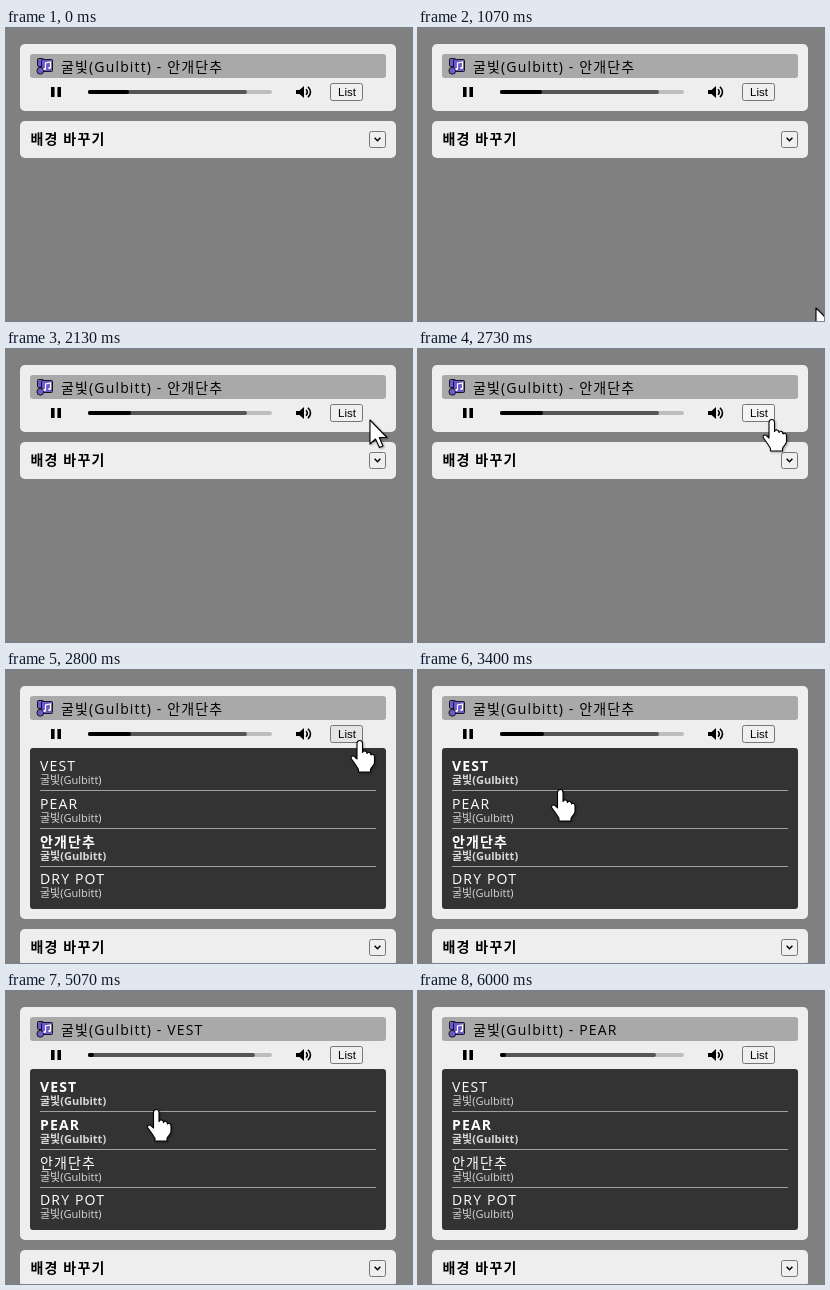
These frames come from a looping animation (406x293 px, 6.33 s). An HTML page:

```html
<!DOCTYPE html>
<html lang="ko">
<head>
<meta charset="utf-8">
<title>Music player</title>
<style>
  html, body { margin: 0; height: 100%; overflow: hidden; background: #808080; }
  svg { display: block; width: 406px; height: 293px; }
  text { font: 14px "Open Sans", "Noto Sans CJK KR", sans-serif; letter-spacing: 1.15px; white-space: pre; }
  .bold, .bold text { font-weight: 700; }
  #list text { fill: #fff; }
  #list .artist { font-size: 11px; letter-spacing: 0; fill: #d6d6d6; }
  #button text { font: 11.5px "Liberation Sans", Arial, sans-serif; letter-spacing: 0; }
  .panel { fill: #eee; }
  .box { fill: #efefef; stroke: #767676; }
  .cursor { fill: #fff; stroke: #000; stroke-width: 1.1; stroke-linejoin: round; filter: drop-shadow(1px 1px 1px #0005); }
</style>
</head>
<body>
<svg viewBox="0 0 406 293">
  <rect id="player" class="panel" x="14" y="16" width="376" rx="5"/>
  <rect x="24" y="26" width="356" height="24" rx="3" fill="#a9a9a9"/>
  <g stroke="#15131f" fill="#6a5cc0">
    <rect x="31.5" y="30.5" width="6" height="8" rx="1"/>
    <rect x="35.5" y="31.5" width="11" height="12" rx="1"/>
    <circle cx="34.3" cy="42.8" r="3.4"/>
    <path d="M39.5 41V35l5-1v6" fill="none" stroke="#fff" stroke-width="1.2"/>
    <path d="M37.5 41h2m3-1h2" stroke="#fff" stroke-width="2"/>
  </g>
  <text id="title" x="55" y="44"></text>

  <path id="pause" d="M45 59h3.6v10H45zm6.4 0H55v10h-3.6z"/>
  <path id="play" d="M46.5 59l9.5 5-9.5 5z"/>
  <rect x="82" y="62" width="184" height="4" rx="2" fill="#bdbdbd"/>
  <rect id="buffered" x="82" y="62" height="4" rx="2" fill="#555"/>
  <rect id="played" x="82" y="62" height="4" rx="2"/>
  <g id="volume">
    <path d="M290 62h3.5l4.5-4v12l-4.5-4H290z"/>
    <path d="M300 61.3q2.6 2.7 0 5.4m2-8q5 5.3 0 10.6" fill="none" stroke="#000" stroke-width="1.6"/>
  </g>
  <g id="button">
    <rect class="box" x="324.5" y="55.5" width="32" height="17" rx="2"/>
    <text x="332" y="68">List</text>
  </g>

  <g id="list"><rect x="24" y="78" width="356" height="161" rx="3" fill="#333"/></g>

  <g id="background">
    <rect class="panel" x="14" y="93" width="376" height="37" rx="5"/>
    <text class="bold" x="24.5" y="116">배경 바꾸기</text>
    <rect class="box" x="363.5" y="103.5" width="16" height="16" rx="2"/>
    <path d="M368.6 109.8l2.9 2.9 2.9-2.9" fill="none" stroke="#000" stroke-width="1.5"/>
  </g>

  <path id="arrow" class="cursor" d="M0 0V24L5.5 19 9.5 27.5 13 26 9.3 17.5H17z"/>
  <path id="hand" class="cursor" d="M-2.5 3C-2.5-1 3-1 3 3V12C4 9.5 7.5 10 7.5 13 8.5 11 11.5 11.5 11.5 14.5 13 13 15 14 15 16.5V22C15 25 12 26 11 29V31.5H-1V29C-2 27-4 24-8 18.5-9.5 16-6.5 14.5-4.5 16.5L-2.5 18.5z"/>
</svg>
<script>
const LOOP = 6330, TICK = 1000 / 15;
const ARTIST = '굴빛(Gulbitt)';
const SONGS = ['VEST', 'PEAR', '안개단추', 'DRY POT'];
const OPEN = 2800, FIRST_PICK = 4000, SECOND_PICK = 5530;

// Pointer position: time, x, y
const PATH = [
  [1067, 398, 280], [1333, 392, 158], [1600, 385, 82], [1667, 376, 76], [2000, 369, 74],
  [2267, 359, 68], [2400, 359, 68], [2467, 353.5, 70.5], [3067, 353.5, 70.5],
  [3200, 262, 104], [3333, 160, 123], [3400, 142, 119.5], [3733, 150, 108.5],
  [5000, 150, 108.5], [5067, 150, 118.5], [5267, 149, 143.5], [5990, 149, 143.5]
];

const $ = id => document.getElementById(id);
const show = (id, on) => $(id).style.display = on ? '' : 'none';
const width = (id, w) => $(id).setAttribute('width', w);

const rows = SONGS.map((song, i) => {
  const row = document.createElementNS('http://www.w3.org/2000/svg', 'g');
  const y = Math.round(i * 37.8);
  row.innerHTML = `<text x="34" y="${101 + y}">${song}</text>
    <text class="artist" x="34" y="${114 + y}">${ARTIST}</text>` +
    (i < 3 ? `<rect x="34" y="${Math.round(120.4 + i * 37.6)}" width="336" height="1" fill="#a0a0a0"/>` : '');
  $('list').append(row);
  return row;
});

function pointerAt(time) {
  const t = Math.floor((time + 4) / TICK) * TICK + 0.5;
  const i = PATH.findIndex(p => p[0] > t);
  if (i < 1) return null;
  const [t0, x0, y0] = PATH[i - 1], [t1, x1, y1] = PATH[i];
  const k = (t - t0) / (t1 - t0);
  return [x0 + (x1 - x0) * k, y0 + (y1 - y0) * k];
}

function playerAt(t) {
  if (t < FIRST_PICK) return { song: 2, buffered: 159, played: Math.round(41.2 + t * 0.0008) };
  if (t < SECOND_PICK) {
    return t < 4470
      ? { song: 0, loading: true, paused: t >= 4330 }
      : { song: 0, buffered: 167, played: t < 4670 ? 0 : 6 };
  }
  return t < 5670
    ? { song: 1, loading: true, paused: t >= 5600 }
    : { song: 1, buffered: 156, played: 6 };
}

function draw(t) {
  const open = t >= OPEN;
  const { song, loading, paused, buffered = 0, played = 0 } = playerAt(t);
  $('title').textContent = `${ARTIST} - ${SONGS[song]}`;
  show('pause', !paused);
  show('play', paused);
  width('buffered', buffered);
  width('played', played);
  $('volume').style.opacity = loading ? 0.3 : 1;

  $('player').setAttribute('height', open ? 233 : 67);
  show('list', open);
  $('background').setAttribute('transform', `translate(0 ${open ? 166 : 0})`);

  const hovered = t < 3195 ? -1 : t < 5065 ? 0 : 1;
  rows.forEach((row, i) => row.classList.toggle('bold', i === song || i === hovered));

  const pointer = pointerAt(t);
  const [x, y] = pointer || [0, 0];
  const onButton = x < 360 && y < 73;
  const hand = pointer && (onButton || open && y > 78);
  show('hand', hand);
  show('arrow', pointer && !hand);
  for (const id of ['hand', 'arrow']) $(id).setAttribute('transform', `translate(${x} ${y})`);
  $('button').firstElementChild.style.fill = pointer && onButton ? (t >= 2730 && t < OPEN ? '#f5f5f5' : '#e5e5e5') : '';
}

const start = performance.now();
function tick() {
  draw((performance.now() - start) % LOOP);
  requestAnimationFrame(tick);
}
tick();
</script>
</body>
</html>
```
